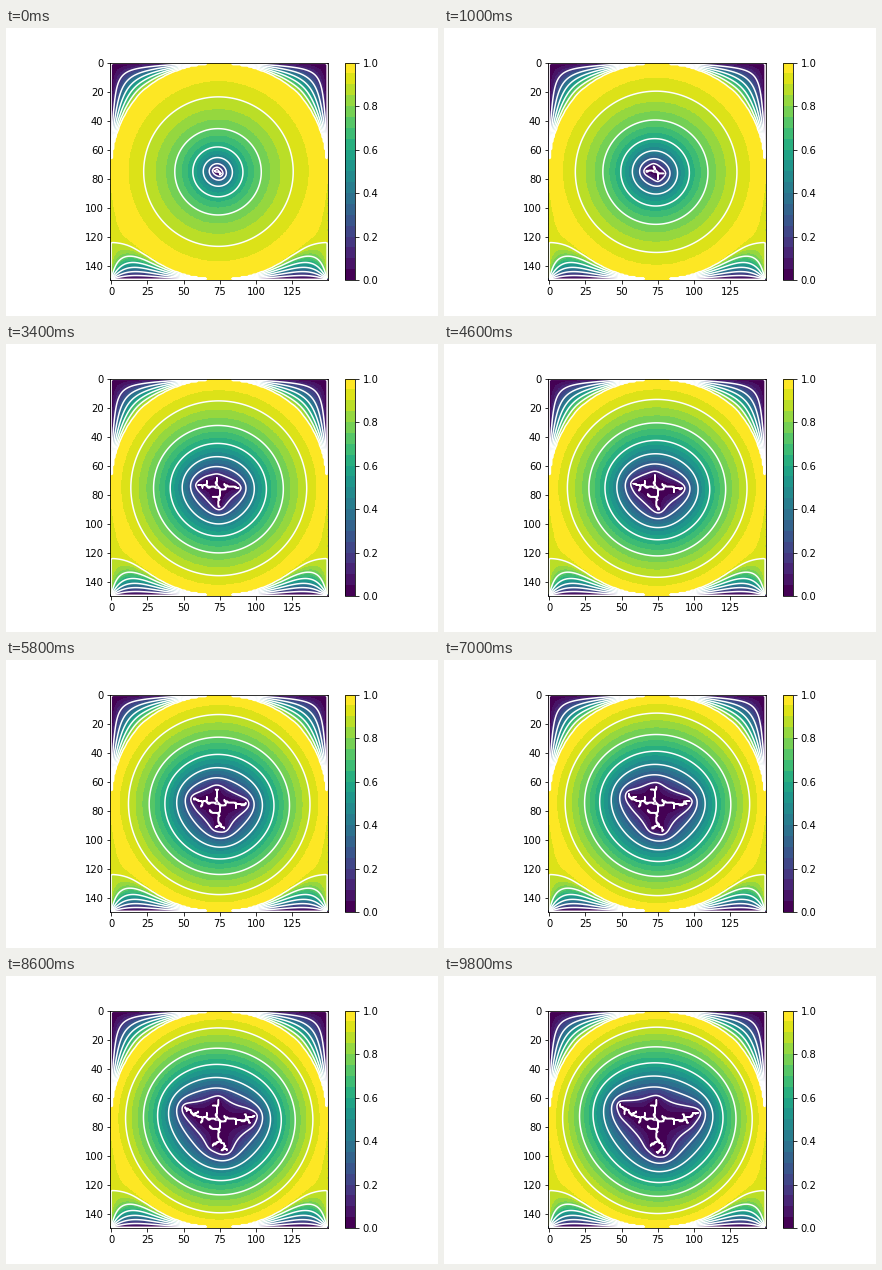
A matplotlib script for the animation above (10000 ms loop, 432x288 px).

```python
import random

import numpy as np
import matplotlib.pyplot as plt
from matplotlib.animation import FuncAnimation

SIZE = 150
FRAMES = 50
STEP_MS = 200
LEVELS = np.arange(7) * 0.15
SEED_CELL = (74, 75)

# Where the four main arms end at each of these frames.
TIMES = (0, 5, 12, 23, 35, 43, 49)
LEFT = ((71, 74), (67, 74), (61, 73), (58, 72), (55, 68), (51, 66), (49, 64))
RIGHT = ((76, 76), (79, 76), (84, 74), (92, 75), (97, 73), (99, 72), (103, 70))
DOWN = ((75, 77), (75, 80), (74, 86), (76, 90), (78, 94), (80, 96), (79, 98))
UP = ((73, 73), (72, 71), (73, 69), (73, 66), (74, 63), (74, 61))

# Tips of the side twigs; each grows out of the nearest cell.
TWIGS = ((78, 72), (71, 81), (60, 69), (62, 77), (66, 70), (86, 78), (92, 71),
         (96, 77), (70, 65), (68, 79), (52, 71), (70, 93), (74, 97))


def walk(rng, start, end):
    """Lattice path between two cells in a shuffled order of unit moves."""
    dx, dy = end[0] - start[0], end[1] - start[1]
    moves = [(np.sign(dx), 0)] * abs(dx) + [(0, np.sign(dy))] * abs(dy)
    if abs(dx) > 3:
        moves += [(0, 1), (0, -1)]
    if abs(dy) > 3:
        moves += [(1, 0), (-1, 0)]
    rng.shuffle(moves)
    x, y = start
    path = [start]
    for mx, my in moves:
        x, y = x + mx, y + my
        path.append((x, y))
    return path


def birth_times():
    rng = random.Random(4)
    birth = np.full((SIZE, SIZE), np.inf)

    def grow(start, end, t0, t1):
        path = walk(rng, start, end)
        for (x, y), t in zip(path, np.linspace(t0, t1, len(path))):
            birth[y, x] = min(birth[y, x], t)

    for arm in (LEFT, RIGHT, DOWN, UP):
        cell, then = SEED_CELL, -2
        for tip, now in zip(arm, TIMES):
            grow(cell, tip, then, now)
            cell, then = tip, now
    for tip in TWIGS:
        rows, cols = np.nonzero(np.isfinite(birth))
        k = np.argmin(np.hypot(cols - tip[0], rows - tip[1]))
        root = (int(cols[k]), int(rows[k]))
        t0 = birth[root[1], root[0]] + 1
        length = abs(tip[0] - root[0]) + abs(tip[1] - root[1])
        grow(root, tip, t0, t0 + 1.8 * length)
    return birth


def relax(phi, free, sweeps, omega=1.95):
    """Red-black over-relaxation of the Laplace equation."""
    inner = phi[1:-1, 1:-1]
    yy, xx = np.indices(inner.shape)
    weights = [omega * (free[1:-1, 1:-1] & ((xx + yy) % 2 == p)) for p in (0, 1)]
    for _ in range(sweeps):
        for w in weights:
            mean = 0.25 * (phi[:-2, 1:-1] + phi[2:, 1:-1] + phi[1:-1, :-2] + phi[1:-1, 2:])
            inner += w * (mean - inner)


def potentials():
    yy, xx = np.indices((SIZE, SIZE))
    mid = (SIZE - 1) / 2
    r = np.hypot(xx - mid, yy - mid)
    ring = np.abs(r - mid) < 0.6
    phi = np.clip(r / mid, 0, 1)
    phi[[0, -1]] = 0
    phi[:SIZE // 2, [0, -1]] = 0
    phi[SIZE // 2:-1, [0, -1]] = 0.9
    phi[ring] = 1
    birth = birth_times()
    fields = []
    for n in range(FRAMES):
        cluster = birth <= n
        phi[cluster] = 0
        relax(phi, ~(ring | cluster), 90 if n else 500)
        fields.append(np.clip(phi, 0, 1))
    return fields


plt.rcParams["figure.subplot.bottom"] = 0.125
fields = potentials()
fig, ax = plt.subplots(figsize=(6, 4), dpi=72)
image = ax.imshow(fields[0], cmap=plt.get_cmap("viridis", 20), vmin=0, vmax=1)
fig.colorbar(image)
lines = []


def draw(n):
    while lines:
        lines.pop().remove()
    image.set_data(fields[n])
    lines.append(ax.contour(fields[n], levels=LEVELS, colors="white", linewidths=1.5))
    return []


anim = FuncAnimation(fig, draw, frames=FRAMES, interval=STEP_MS,
                     init_func=lambda: [], repeat=True, repeat_delay=0)
plt.show()
```
